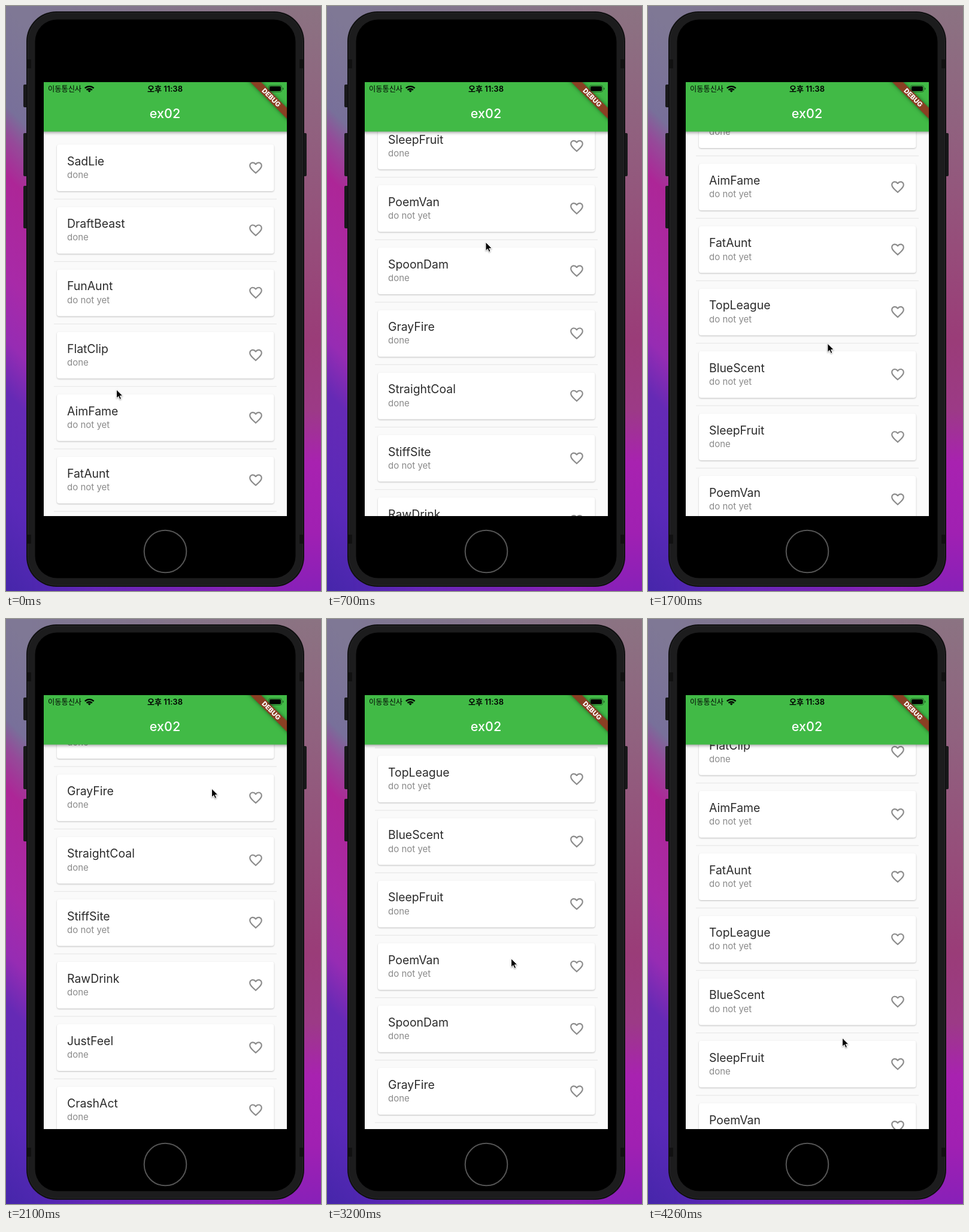
These frames come from a looping animation (526 by 976 pixels, 4420 ms). An HTML page:

```html
<!DOCTYPE html>
<html lang="ko">
<head>
<meta charset="utf-8">
<title>ex02</title>
<style>
  html, body { margin: 0; width: 100%; height: 100%; overflow: hidden; background: #000; }
  svg { display: block; width: 100%; height: 100%; font-family: Inter, "Noto Sans CJK KR", "Noto Sans CJK", sans-serif; }
  .card { fill: #fff; filter: drop-shadow(0 1px 1px rgba(0, 0, 0, .24)); }
  .name { font-size: 19.4px; fill: #2b2b2b; }
  .state { font-size: 15px; fill: #8a8a8a; }
  .bar { filter: drop-shadow(0 2px 2.5px rgba(0, 0, 0, .36)); }
  .ribbon { filter: drop-shadow(0 0 3px rgba(0, 0, 0, .5)); }
  #cursor { filter: drop-shadow(0 1px 1px rgba(0, 0, 0, .35)); }
</style>
</head>
<body>
<svg viewBox="0 0 526 976">
  <defs>
    <linearGradient id="left" gradientUnits="userSpaceOnUse" x1="0" y1="0" x2="-488" y2="488">
      <stop offset="0" stop-color="#7f7895"/>
      <stop offset=".17" stop-color="#78709a"/>
      <stop offset=".22" stop-color="#954a99"/>
      <stop offset=".29" stop-color="#ad2697"/>
      <stop offset=".46" stop-color="#a82aa8"/>
      <stop offset=".57" stop-color="#962cb3"/>
      <stop offset=".66" stop-color="#652ab5"/>
      <stop offset=".84" stop-color="#5a29b8"/>
      <stop offset="1" stop-color="#4626aa"/>
    </linearGradient>
    <linearGradient id="right" x1="0" y1="0" x2="0" y2="1">
      <stop offset="0" stop-color="#8b7382"/>
      <stop offset=".2" stop-color="#90627f"/>
      <stop offset=".41" stop-color="#964d7a"/>
      <stop offset=".57" stop-color="#9a3c78"/>
      <stop offset=".69" stop-color="#9c3a86"/>
      <stop offset=".78" stop-color="#a822b0"/>
      <stop offset=".9" stop-color="#a020b2"/>
      <stop offset="1" stop-color="#8820b8"/>
    </linearGradient>
    <linearGradient id="across">
      <stop offset=".08" stop-color="#000"/>
      <stop offset=".92" stop-color="#fff"/>
    </linearGradient>
    <mask id="blend"><rect width="526" height="976" fill="url(#across)"/></mask>
    <clipPath id="screen"><rect x="63" y="127" width="406" height="724"/></clipPath>
    <path id="heart" fill="#8c8c8c" transform="translate(404 257) scale(1.083)" d="M16.5 3c-1.74 0-3.41.81-4.5 2.09C10.91 3.81 9.24 3 7.5 3 4.42 3 2 5.42 2 8.5c0 3.78 3.4 6.86 8.55 11.54L12 21.35l1.45-1.32C18.6 15.36 22 12.28 22 8.5 22 5.42 19.58 3 16.5 3zm-4.4 15.55l-.1.1-.1-.1C7.14 14.24 4 11.39 4 8.5 4 6.5 5.5 5 7.5 5c1.54 0 3.04.99 3.57 2.36h1.87C13.46 5.99 14.96 5 16.5 5c2 0 3.5 1.5 3.5 3.5 0 2.89-3.14 5.74-7.9 10.05z"/>
  </defs>

  <!-- wallpaper -->
  <rect width="526" height="976" fill="url(#left)"/>
  <rect width="526" height="976" fill="url(#right)" mask="url(#blend)"/>

  <!-- phone -->
  <g fill="#18181a">
    <rect x="29" y="131" width="8" height="38" rx="2"/>
    <rect x="29" y="212" width="8" height="72" rx="2"/>
    <rect x="29" y="300" width="8" height="71" rx="2"/>
    <rect x="495" y="212" width="7" height="72" rx="2"/>
  </g>
  <rect x="34" y="9" width="464" height="960" rx="50" fill="#101011"/>
  <rect x="36.5" y="11.5" width="459" height="955" rx="48" fill="#1c1c1d" stroke="#262628"/>
  <g fill="#111">
    <rect x="35" y="89" width="7" height="15"/><rect x="490" y="89" width="7" height="15"/>
    <rect x="35" y="882" width="7" height="15"/><rect x="490" y="882" width="7" height="15"/>
  </g>
  <rect x="48.5" y="22.5" width="435" height="932" rx="37"/>
  <circle cx="266" cy="910" r="35.3" fill="none" stroke="#555" stroke-width="2"/>

  <!-- app -->
  <g clip-path="url(#screen)">
    <rect x="63" y="127" width="406" height="724" fill="#fafafa"/>
    <g id="list"></g>
    <rect class="bar" x="53" y="117" width="426" height="92.5" fill="#41ba46"/>
    <text x="265.5" y="187" text-anchor="middle" font-size="21.5" font-weight="500" fill="#fff">ex02</text>
    <path class="ribbon" d="M398 117L416 117 479 180 479 198Z" fill="#8a3f23"/>
    <text transform="translate(443 152.7) rotate(45)" y="4" text-anchor="middle" font-size="11.1" font-weight="800" fill="#fff">DEBUG</text>
    <text x="70" y="142.5" font-size="12.2">이동통신사</text>
    <text x="265.5" y="142.8" text-anchor="middle" font-size="13" font-weight="600">오후 11:38</text>
    <g fill="none" stroke="#000" stroke-width="2.4">
      <path d="M131.8 137.2a10.4 10.4 0 0 1 14.8 0M134.6 140.2a6.4 6.4 0 0 1 9.2 0"/>
      <path d="M139.2 144l-2.5-2.6a3.6 3.6 0 0 1 5 0z" fill="#000" stroke="none"/>
    </g>
    <rect x="438.5" y="132.5" width="22" height="11" rx="3" fill="none" stroke="#000" stroke-opacity=".45"/>
    <rect x="440" y="134" width="19" height="8" rx="1.8"/>
    <path d="M462 136v4q1.6-.6 1.6-2t-1.6-2" opacity=".5"/>
  </g>

  <path id="cursor" d="M0 0V14.4L3.3 11.3 5.5 16.4 8 15.3 5.8 10.4H10.4Z" stroke="#fff" stroke-width="1" stroke-linejoin="round"/>
</svg>

<script>
const names = `SadLie DraftBeast FunAunt FlatClip AimFame FatAunt TopLeague BlueScent
  SleepFruit PoemVan SpoonDam GrayFire StraightCoal StiffSite RawDrink JustFeel
  CrashAct JointGrief MadBean PayLength CalmShade WarmChair`.split(/\s+/);
const pending = [2, 4, 5, 6, 7, 9, 13, 18, 19];
const pitch = 104.2, loop = 4420;

// time, scroll offset, pointer x, pointer y
const keys = [
  [0, 0, 184.5, 640],
  [300, 330, 225, 470],
  [700, 870, 265, 394],
  [800, 880, 268, 400],
  [1300, -10, 262.5, 732],
  [1400, -35, 265, 745],
  [2100, 1118, 343.5, 283],
  [2200, 1145, 343, 288],
  [2700, -67.5, 318.5, 822],
  [2800, -85, 317, 832],
  [3600, 1445, 301.5, 301],
  [3700, 1475, 302, 305],
  [4260, 361, 324.5, 699]
];

const list = document.getElementById('list');
const cursor = document.getElementById('cursor');

list.innerHTML = names.map((name, i) => `
  <g transform="translate(0 ${i * pitch})">
    <rect class="card" x="85" y="231" width="362.5" height="78" rx="4"/>
    <text class="name" x="102" y="266">${name}</text>
    <text class="state" x="102" y="287.3">${pending.includes(i) ? 'do not yet' : 'done'}</text>
    <use href="#heart"/>
    <rect x="80" y="321.6" width="372" height="1.1" fill="#e6e6e6"/>
  </g>`).join('');

const slope = (i, col) =>
  (keys[i + 1][col] - keys[i][col]) / (keys[i + 1][0] - keys[i][0]);

// Monotone tangent: flat at turning points and at both ends.
function tangent(i, col) {
  if (i === 0 || i === keys.length - 1) return 0;
  const a = slope(i - 1, col), b = slope(i, col);
  return a * b > 0 ? 2 * a * b / (a + b) : 0;
}

function valueAt(time, col) {
  let i = 0;
  while (i < keys.length - 2 && time >= keys[i + 1][0]) i++;
  const [from, to] = [keys[i], keys[i + 1]];
  const span = to[0] - from[0], u = (time - from[0]) / span, v = 1 - u;
  return from[col] * v * v * (1 + 2 * u) + to[col] * u * u * (3 - 2 * u)
    + span * u * v * (tangent(i, col) * v - tangent(i + 1, col) * u);
}

// The picture changes in hard steps of 100 ms, with two longer holds at the end.
const stepTime = t => t >= 4260 ? 4260 : Math.min(4100, Math.floor(t / 100) * 100);

const start = performance.now();
function draw() {
  const time = stepTime((performance.now() - start) % loop);
  list.setAttribute('transform', `translate(0 ${-valueAt(time, 1)})`);
  cursor.setAttribute('transform', `translate(${valueAt(time, 2)} ${valueAt(time, 3)})`);
  requestAnimationFrame(draw);
}
draw();
</script>
</body>
</html>
```
